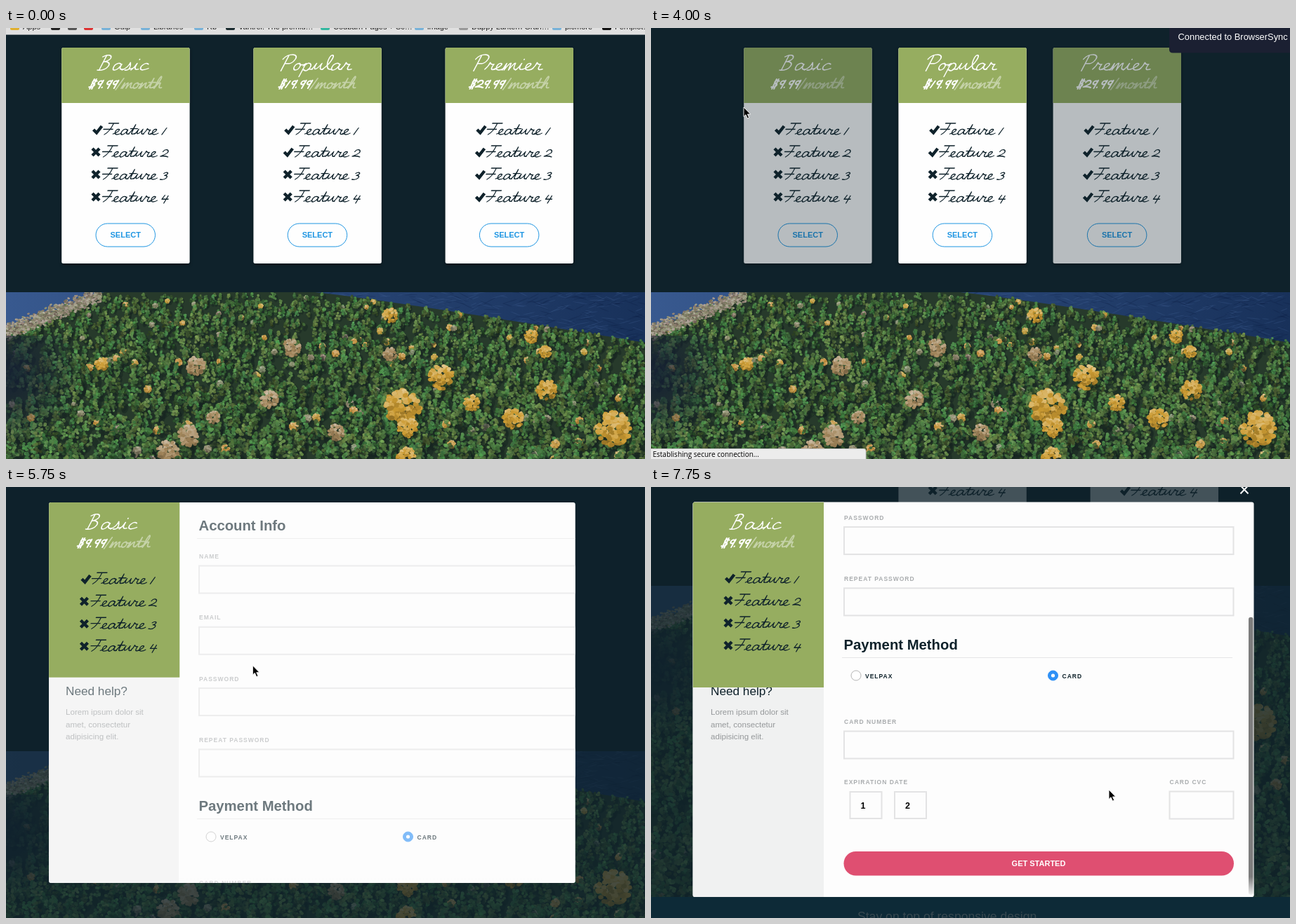
These frames come from a looping animation (910 px wide and 615 px high, 8000 ms). An HTML page with a canvas:

```html
<!DOCTYPE html>
<html lang="en">
<head>
<meta charset="utf-8">
<title>Pricing checkout</title>
<style>
  html, body { margin: 0; width: 910px; height: 615px; overflow: hidden; background: #0f222b; }
  main { position: relative; width: 910px; height: 615px; overflow: clip; contain: strict; }
  canvas, svg { position: absolute; left: 0; top: 0; display: block; }
  svg { font-family: "Liberation Sans", Arial, sans-serif; overflow: hidden; }
  .ink { fill: none; stroke-linecap: round; stroke-linejoin: round; }
  .bold { font-weight: bold; }
  .label { font-weight: bold; font-size: 8.5px; letter-spacing: 1px; fill: #aaadaf; }
  .title { font-weight: bold; font-size: 20.3px; fill: #0f222b; }
  .input { fill: #fdfdfd; stroke: #e3e3e4; stroke-width: 2; }
  .small { font-family: "Open Sans", "Noto Sans", sans-serif; font-size: 10px; }
  .card { filter: drop-shadow(0 2px 2px rgba(0,0,0,.4)); }
</style>
</head>
<body>
<main>
  <canvas id="photo" width="910" height="615"></canvas>
  <svg id="stage" width="910" height="615" viewBox="0 0 910 615"></svg>
</main>
<script>
const $ = id => document.getElementById(id);
const set = (id, attrs) => { for (const k in attrs) $(id).setAttribute(k, attrs[k]); };
const show = (id, on) => set(id, { visibility: on ? 'visible' : 'hidden' });
const move = (id, x, y) => set(id, { transform: `translate(${x} ${y})` });
const mix = (a, b, p) => a + (b - a) * p;
const DARK = '#0f222b', GREEN = '#96ad60', BLUE = '#1d95e2';

// Piecewise linear track: keys are [time, value, value...]
function track(keys, t) {
  let i = 0;
  while (i < keys.length - 2 && t >= keys[i + 1][0]) i++;
  const a = keys[i], b = keys[i + 1];
  const p = Math.min(1, Math.max(0, (t - a[0]) / (b[0] - a[0])));
  return a.slice(1).map((v, k) => mix(v, b[k + 1], p));
}

// Single-stroke cursive letters: advance and pen path, slanted when written
const pen = {
  a: [12, 'M9-6C6-10 1-8 1-3S7 1 9-7C8-2 9 0 13-1'],
  c: [11, 'M9-7C5-10 1-5 2-2S7 0 11-2'],
  e: [10, 'M0-1C6-3 9-8 5-8S1 0 6 0Q9 0 11-2'],
  h: [11, 'M0-1C6-6 8-18 5-18Q3-16 2 0Q5-9 8-8Q7 1 12-1'],
  i: [8, 'M0 0Q3-3 4-8Q2 1 8-1M5-13v.5'],
  l: [9, 'M0-1C6-6 9-18 5-18S2 1 10-1'],
  m: [15, 'M0 0L2-8L2 0Q5-9 7-8L7 0Q10-9 12-8Q11 1 16-1'],
  n: [11, 'M0 0L2-8L2 0Q6-9 8-8Q7 1 12-1'],
  o: [10, 'M6-8C0-8 0 0 4 0S9-8 5-8Q8-5 12-7'],
  p: [12, 'M1-5L3-8L1 8M3-6C6-11 11-7 9-2S4 0 2-1M8-1L13-1'],
  r: [10, 'M0-1Q3-5 3-9Q5-6 8-7C6-2 7 1 12-1'],
  s: [10, 'M0 0C4-2 6-6 6-9C8-5 9 1 3 0M7-1L11-2'],
  t: [9, 'M0-1Q4-6 5-15L4-3Q4 1 10-2M0-9H10'],
  u: [12, 'M0-1Q2-4 3-8C1 0 5 2 9-8Q8 1 13-1'],
  B: [16, 'M4-18L2 0M0-16C10-22 14-12 4-10C15-11 12 2 0 0'],
  F: [14, 'M2-17H16M9-17Q8-4 2 0M-2-8H11'],
  P: [14, 'M4-17L2 1M-1-13C2-21 15-20 13-13S6-8 3-8'],
  '/': [6, 'M-1 2L4-15'],
  ' ': [6, ''],
  '.': [4, 'M1-.5v.6'],
  '$': [9, 'M8-10C2-13 0-8 5-6S3 1 0-1M3-13L2 2M6-13L5 2'],
  1: [6, 'M1 0L4-10'],
  2: [10, 'M1-8C3-13 10-11 8-6Q5-3 0-1Q6-2 11 0'],
  3: [10, 'M2-9C6-13 11-8 4-6C12-6 8 2 0 0'],
  4: [10, 'M3-10L1-4H10M8-9L6 2'],
  9: [9, 'M8-9C3-13 0-6 4-5S8-9 8-11L6 1']
};
const inkWidth = text => [...text].reduce((w, c) => w + pen[c][0], 0);
function write(text, x, y, size, weight, color, opacity = 1) {
  let at = 0;
  const strokes = [...text].map(c => {
    const d = pen[c][1], path = d && `<path transform="translate(${at})" d="${d}"/>`;
    at += pen[c][0];
    return path;
  }).join('');
  return `<g class="ink" role="img" aria-label="${text}" stroke="${color}" stroke-width="${weight}" opacity="${opacity}"
    transform="translate(${x} ${y}) skewX(-22) scale(${size} ${size * .94})">${strokes}</g>`;
}

const rect = (x, y, w, h, fill, extra = '') =>
  `<rect x="${x}" y="${y}" width="${w}" height="${h}" fill="${fill}" ${extra}/>`;
const text = (x, y, s, extra = '') => `<text x="${x}" y="${y}" ${extra}>${s}</text>`;

const plans = [
  { name: 'Basic', price: '$9.99', has: 1 },
  { name: 'Popular', price: '$19.99', has: 2 },
  { name: 'Premier', price: '$29.99', has: 4 }
];
function heading({ name, price }) {
  const size = 1.26, w = inkWidth(name) * size;
  const left = 169 - (inkWidth(price) + inkWidth('/month')) / 2;
  return write(name, 166 - w / 2, 60, size, 1.3, '#fff') +
    write(price, left, 85, .98, 2.2, '#fff') +
    write('/month', left + inkWidth(price), 86, 1, 1.9, '#fff', .45);
}
function features({ has }) {
  return [1, 2, 3, 4].map(n => {
    const y = 145 + 32 * (n - 1), x = n === 1 ? 123 : 121.5;
    const icon = n <= has ? `M${x + 1.5} ${y}l4.500 4.500L${x + 13.5} ${y - 5}` : `M${x + 1.5} ${y - 5}l10 10m0-10l-10 10`;
    return `<path d="${icon}" fill="none" stroke="${DARK}" stroke-width="4.4"/>` +
      write('Feature ' + n, x + 15, y + 7, 1, 1.4, DARK);
  }).join('');
}
const card = (plan, i) => `<g id="card${i}"><g class="card">
  <rect id="body${i}" x="79.2" y="28" width="182.4" height="308" rx="2.5" fill="#fefefe"/>
  <path d="M79.200 107V30.500q0-2.500 2.500-2.500h177.400q2.500 0 2.500 2.500V107z" fill="${GREEN}"/></g>
  <g id="words${i}">${heading(plan)}${features(plan)}</g>
  <g id="button${i}" fill="${BLUE}" stroke="${BLUE}">
    <rect x="128" y="279" width="84.500" height="33" rx="16.500" fill="none"/>
    ${text(170.2, 299, 'SELECT', 'class="bold" font-size="11" text-anchor="middle" stroke="none"')}</g></g>`;

const field = (label, y, x = 275, w = 554.5) =>
  text(x, y, label, 'class="label"') + rect(x, y + 10.5, w, 39, '', 'class="input"');
const section = (label, y) => text(274.5, y, label, 'class="title"') + rect(272, y + 11, 556, 1, '#e6e6e7');
const choice = (x, label, on) =>
  `<circle cx="${x}" cy="499" r="7" fill="${on ? '#2f91f6' : '#fff'}" stroke="${on ? '#2f91f6' : '#b5b5b5'}"/>` +
  (on ? `<circle cx="${x}" cy="499" r="2.600" fill="#fff"/>` : '') +
  text(x + 13, 503, label, `class="label" style="fill:${DARK}"`);
const month = (x, n) => rect(x, 665, 45, 38, '', 'class="input"') +
  text(x + 15, 689, n, 'class="bold" font-size="12.5"');

const form = section('Account Info', 62) +
  ['NAME', 'EMAIL', 'PASSWORD', 'REPEAT PASSWORD'].map((s, i) => field(s, 102 + 87.3 * i)).join('') +
  section('Payment Method', 462) + choice(292, 'VELPAX') + choice(572.5, 'CARD', true) +
  field('CARD NUMBER', 568) + text(275, 654, 'EXPIRATION DATE', 'class="label"') +
  month(283.5, 1) + month(347, 2) + field('CARD CVC', 654, 738.5, 91) +
  rect(274.5, 750, 555.5, 34.5, '#df4f71', 'rx="17.200"') +
  text(552, 771, 'GET STARTED', 'class="bold" font-size="11" fill="#fff" text-anchor="middle"');

const help = ['Lorem ipsum dolor sit', 'amet, consectetur', 'adipisicing elit.']
  .map((s, i) => text(85, 325 + 17.7 * i, s, 'font-size="11.6" fill="#95989a"')).join('');

const folder = '#78b2d8';
const bookmarks = [
  [6, 'Apps', '#e0b030'], [64, '', '#222'], [88, '', '#555'], [111, '', '#d33'], [136, 'Gulp', folder],
  [192, 'Libraries', folder], [268, 'Rb', folder], [313, 'Vantrel: The premiu…', '#1c2c30'],
  [448, 'Codbarn Pages + Sc…', '#35b8a0'], [582, 'image', folder], [645, 'Dappy Lantern Gran…', '#999'],
  [778, 'picmore', folder], [849, 'Fernplot…', '#111']
].map(([x, s, c]) => rect(x, -8, 13, 11, c, 'rx="2"') + text(x + 18, 2, s, 'font-size="11" fill="#222"')).join('');

$('stage').innerHTML = `
  <defs>
    <clipPath id="frame"><rect id="frameRect" rx="3"/></clipPath>
    <linearGradient id="fade" x2="0" y2="1"><stop stop-color="#fdfdfd" stop-opacity="0"/><stop offset="1" stop-color="#fdfdfd"/></linearGradient>
  </defs>
  <g id="page">
    ${rect(0, 821, 910, 400, '#094963')}
    ${text(294, 855, 'Stay on top of responsive design', 'font-size="17.600" fill="#c4ced3"')}
    ${[0, 2, 1].map(i => card(plans[i], i)).join('')}
  </g>
  ${rect(0, 370, 910, 245, '#fefefe', 'id="blank"')}
  ${rect(0, 0, 910, 615, DARK, 'id="shade"')}
  <g id="toast"><path d="M738 0H910V35.500H743q-5 0-5-5z" fill="#1b2032"/>
    ${text(750.5, 17, 'Connected to BrowserSync', 'font-size="12.900" fill="#fff"')}</g>
  <g id="status"><path d="M-1 616V600.500H303q3 0 3 3V616z" fill="#ececec" stroke="#c9c9c9"/>
    <text id="statusText" class="small" x="2.500" y="612"></text></g>
  <g id="modal">
    <rect id="edge" x="7.500" y="608.500" width="895" height="20" rx="4" fill="none" stroke="#091015"/>
    <g clip-path="url(#frame)">
      ${rect(0, 0, 910, 615, '#fdfdfd')}
      <g id="form"><g id="fields">${form}</g>
        <rect id="thumb" x="851" width="6.500" height="396" rx="3.200" fill="#7d7d7d"/>
        ${rect(246, 556, 613, 29, 'url(#fade)')}
        ${rect(59.5, 21, 186.5, 565, '#f0f1f1')}
        ${text(85, 297, 'Need help?', `font-size="17.200" fill="${DARK}"`)}${help}</g>
      <rect id="panel" fill="${GREEN}"/>
      <g id="planHead">${heading(plans[0])}</g><g id="planList">${features(plans[0])}</g>
    </g>
    <path id="close" d="M839.500-2l11 11.500m0-11.500l-11 11.500" stroke="#fff" stroke-width="2"/>
  </g>
  <g id="bar">${rect(0, -20, 910, 29.5, '#e0e0e0')}${rect(0, 9, 910, 1, '#8d9498')}${bookmarks}</g>
  <path id="cursor" d="M0 0V13.500L3 10.700 5.300 16 7.700 15 5.400 10H9.700Z" fill="#000" stroke="#fff" stroke-width=".9"/>`;

// Woodland by a lake, grown once from seeded random numbers
function paintPhoto() {
  const picture = document.createElement('canvas');
  picture.width = 910;
  picture.height = 444;
  const c = picture.getContext('2d');
  let seed = 7;
  const rnd = () => (seed = seed * 16807 % 2147483647) / 2147483647;
  const blob = (x, y, rx, ry, fill) => {
    c.fillStyle = fill;
    c.beginPath();
    c.ellipse(x, y, rx, ry, rnd() - .5, 0, 7);
    c.fill();
  };
  const blend = (x0, y0, x1, y1, from, to) => {
    const g = c.createLinearGradient(x0, y0, x1, y1);
    g.addColorStop(0, from);
    g.addColorStop(1, to);
    c.fillStyle = g;
    c.fillRect(0, 0, 910, 444);
  };
  const tuft = (x, y, r, hue, sat, light) => {
    blob(x + r * .25, y + r * .5, r * .9, r * .7, 'rgba(24,36,26,.45)');
    for (let i = 0; i < 25 + r * 4; i++) {
      const a = rnd() * 6.3, d = Math.sqrt(rnd()) * r, size = 1 + r * .09;
      const tone = light + rnd() * 22 - 11 - d * Math.sin(a) / r * 10;
      blob(x + Math.cos(a) * d, y + Math.sin(a) * d, size * 1.2, size, `hsl(${hue},${sat}%,${tone}%)`);
    }
  };
  const shore = x => x < 440 ? Math.max(0, 54 - x * .4) : 72 * ((x - 440) / 470) ** 1.1;

  blend(0, 0, 910, 60, '#38598f', '#18315a');
  for (let i = 0; i < 500; i++)
    blob(440 + rnd() * 470, rnd() * 75, 4 + rnd() * 8, .6, `rgba(${rnd() < .5 ? '70,105,155' : '10,28,62'},.25)`);
  c.fillStyle = '#273a2b';
  c.beginPath();
  c.moveTo(0, 444);
  for (let x = 0; x <= 910; x += 10) c.lineTo(x, shore(x));
  c.lineTo(910, 444);
  c.fill();

  const count = 6500;
  for (let i = 0; i < count; i++) {
    const y = 444 * (i / count) ** 1.15 + rnd() * 14, x = rnd() * 910;
    if (y < shore(x) + 2) continue;
    const r = 3 + y / 50 + rnd() * 2, hue = 86 + rnd() * 38, light = 20 + rnd() * 17;
    blob(x + r * .5, y + r * .5, r * .6, r, 'rgba(22,36,32,.5)');
    for (let k = 0; k < 9; k++) {
      const h = rnd(), spread = r * (.2 + h * .5);
      blob(x + (rnd() - .6) * spread * 2, y - r + h * r * 1.8, 1 + r * .15, 1 + r * .12,
        `hsl(${hue},${26 + rnd() * 8}%,${light + rnd() * 14 - h * 6}%)`);
    }
    const odds = rnd(), band = y < 100 && x > 130 ? .035 : .012;
    if (odds < band) tuft(x, y, r * .7, 36 + rnd() * 8, 52, 54);
    else if (odds < band + .016) tuft(x, y, r * .6, 25 + rnd() * 60, 13, 48);
  }
  for (let i = 0; i < 900; i++) {
    const x = rnd() * 135;
    blob(x, shore(x) + (rnd() + rnd() - .8) * 14, 2, 1.4, `hsl(${20 + rnd() * 50},12%,${38 + rnd() * 28}%)`);
  }
  const golden = [[547, 410, 10], [748, 440, 9], [620, 498, 17], [565, 540, 25], [572, 570, 14], [770, 516, 14],
    [865, 572, 24], [722, 557, 14], [663, 535, 11], [136, 480, 9], [570, 612, 13], [768, 462, 8]];
  const pale = [[375, 530, 12], [270, 482, 13], [407, 456, 12], [260, 582, 15], [230, 604, 15], [295, 555, 9], [470, 577, 11], [547, 465, 9]];
  golden.forEach(([x, y, r]) => tuft(x, y - 377, r, 41, 60, 52));
  pale.forEach(([x, y, r]) => tuft(x, y - 377, r, 36, 28, 54));

  const gloom = c.createRadialGradient(0, 115, 10, 0, 115, 110);
  gloom.addColorStop(0, 'rgba(20,31,52,.85)');
  gloom.addColorStop(1, 'rgba(20,31,52,0)');
  c.fillStyle = gloom;
  c.fillRect(0, 62, 120, 170);
  return picture;
}
const photo = paintPhoto(), view = $('photo').getContext('2d');

const cursorPath = [[500, 110, 20], [750, 50, 62], [1000, 18, 74], [1250, 7, 67], [1750, 7, 63], [3250, 7, 63], [3750, 40, 80],
  [4000, 132, 113], [4250, 180, 190], [4750, 167, 297], [5500, 167, 297], [6250, 720, 170], [6500, 727, 157],
  [7000, 727, 157], [7750, 652, 432]];
const spreadKeys = [[3500, 0], [3750, .25], [4000, .806], [4250, 1]];
const shadeKeys = [[5000, 0], [5250, .1], [5500, .45], [5750, .72], [6000, .78]];
const openKeys = [[5250, 0], [5500, .4], [5750, .92], [6000, 1]];
const formScroll = [[6750, 0], [7000, 30], [7250, 130], [7500, 230]];
const pageScroll = [[7250, 0], [7500, 70], [7750, 236]];

function render(t) {
  const loading = t >= 3250 && t < 3750;
  const spread = t < 3250 ? 1 : track(spreadKeys, t)[0];
  const [open] = track(openKeys, t), [scroll] = track(pageScroll, t), [inner] = track(formScroll, t);

  move('page', 0, -scroll);
  view.clearRect(0, 0, 910, 615);
  view.drawImage(photo, 0, Math.round(377 - scroll));
  show('blank', loading);
  [0, 1, 2].forEach(i => {
    move('card' + i, 273.2 * (1 + (i - 1) * spread), 0);
    set('card' + i, { opacity: i === 1 ? 1 : spread < 1 ? spread * .87 : 1 });
    set('body' + i, { height: loading ? 301 : 308 });
    set('words' + i, { opacity: loading ? 0 : 1 });
    move('button' + i, 0, loading ? -7 : 0);
  });
  set('card0', { display: open > 0 ? 'none' : 'inline' });
  const pressed = t >= 4750 && t < 5500;
  set('button0', { fill: pressed ? '#174b73' : BLUE, stroke: pressed ? '#174b73' : BLUE });

  set('shade', { opacity: track(shadeKeys, t)[0] });
  show('toast', t >= 4000 && t < 5750);
  show('status', t >= 3250 && t < 5750);
  set('status', { opacity: t < 3500 ? .3 : 1 });
  $('statusText').textContent = t < 4000 ? 'Waiting for fonts.googleapis.com...'
    : t < 4250 ? 'Establishing secure connection...' : 'Waiting for codyhouse.co...';

  set('modal', { display: open > 0 ? 'inline' : 'none' });
  const x = mix(79.2, 59.5, open), y = mix(28, 21.5, open);
  set('frameRect', { x, y, width: mix(182.4, 799, open), height: mix(308, 563.5, open) });
  set('panel', { x, y, width: mix(182.4, 186.5, open), height: mix(79, 264.5, open) });
  move('planHead', -18 * open, 0);
  move('planList', -18 * open, -15 * open);
  set('form', { opacity: Math.max(0, open * 5 - 4) });
  set('close', { opacity: open === 1 ? 1 : 0 });
  set('edge', { opacity: t >= 6000 && t < 7000 ? 1 : 0 });
  move('fields', 0, -inner);
  set('thumb', { y: 24 + inner * 558 / 794, opacity: t >= 7000 ? 1 : 0 });

  show('bar', t < 750);
  move('bar', 0, -t / 80);
  show('cursor', t >= 500);
  move('cursor', ...track(cursorPath, t));
}

// The screen refreshes four times a second
const STEP = 250, LOOP = 8000, start = performance.now();
function tick(now) {
  const t = Math.max(0, now - start) % LOOP;
  render(Math.floor(t / STEP) * STEP);
  requestAnimationFrame(tick);
}
render(0);
requestAnimationFrame(tick);
</script>
</body>
</html>
```
